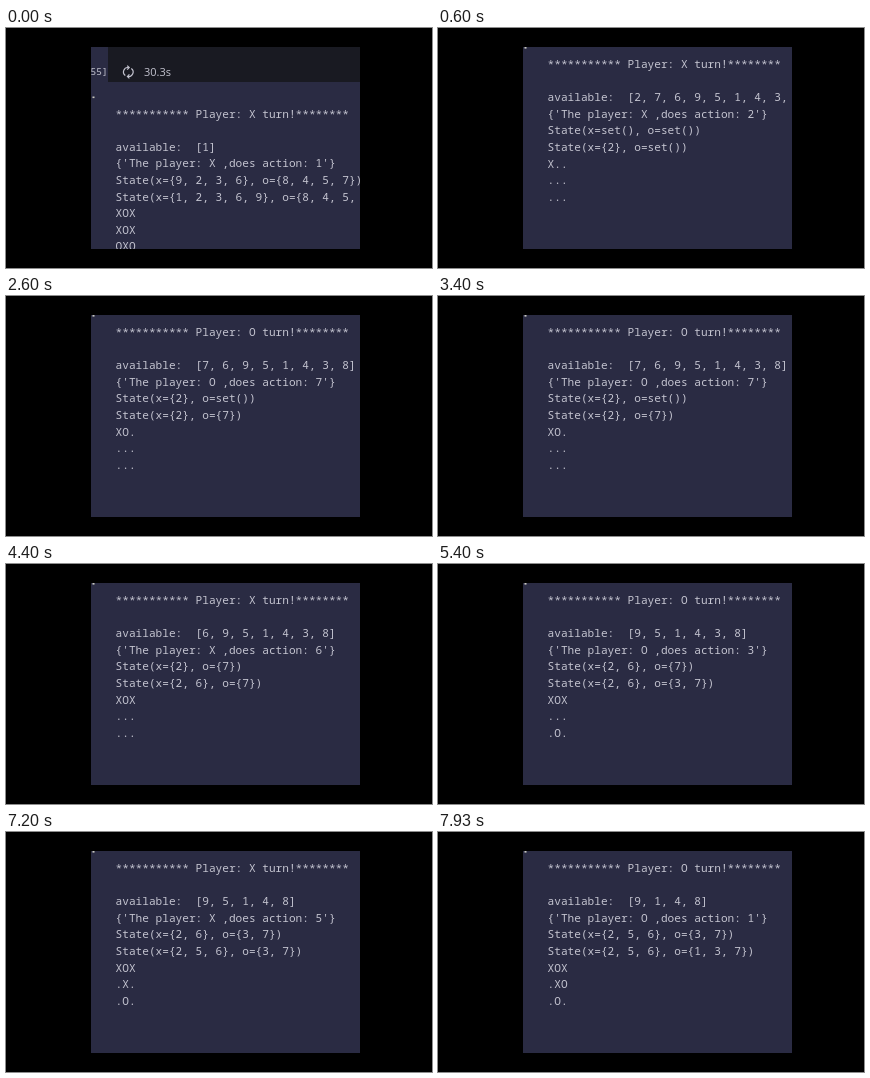
Animation of 426x240 px, one loop 8 s. Source, as an HTML page:

```html
<!DOCTYPE html>
<html lang="en">
<head>
<meta charset="utf-8">
<title>Tic-tac-toe log</title>
<style>
  html, body { margin: 0; width: 100%; height: 100%; overflow: hidden; background: #000; }
  svg { display: block; width: 100%; height: 100%; }
  text { fill: #c4c4d0; white-space: pre; }
  .log { font: 11.11px "Noto Sans Mono", "DejaVu Sans Mono", monospace; }
  .time { font: 11px "Open Sans", "Noto Sans", sans-serif; }
  .index { font: 9.5px "Noto Sans Mono", monospace; }
</style>
</head>
<body>
<svg viewBox="0 0 426 240">
  <clipPath id="panel"><rect x="85" y="19" width="269" height="202"/></clipPath>
  <g clip-path="url(#panel)">
    <rect x="85" y="19" width="269" height="202" fill="#2a2b43"/>
    <g id="header">
      <rect x="102" y="19" width="252" height="35" fill="#191a22"/>
      <text class="index" x="84.5" y="47">55]</text>
      <g fill="none" stroke="#c4c4d0" stroke-width="1.2">
        <path d="M119.3 47.5A4.4 4.4 0 0 1 122.6 39.6M125.3 40.5A4.4 4.4 0 0 1 122 48.4"/>
        <path d="M121.2 37.6L123.2 39.6L121.2 41.6M123.4 46.4L121.4 48.4L123.4 50.4"/>
      </g>
      <text class="time" x="138" y="48">30.3s</text>
    </g>
    <g id="output">
      <rect x="86.5" y="19" width="2" height="1.6" fill="#c8c8c0"/>
      <g id="lines"></g>
    </g>
  </g>
</svg>
<script>
const LOOP = 8000, LINE = 16.57;
const CELLS = [2, 7, 6, 9, 5, 1, 4, 3, 8];
const TURNS = [
  { at: 70, move: 2 },
  { at: 2070, move: 7 },
  { at: 4330, move: 6 },
  { at: 5330, move: 3 },
  { at: 6270, move: 5 },
  { at: 7270, move: 1 }
];
const byId = id => document.getElementById(id);

const rows = Array.from({ length: 9 }, (_, i) => {
  const row = document.createElementNS("http://www.w3.org/2000/svg", "text");
  row.setAttribute("class", "log");
  row.setAttribute("x", 109.6);
  row.setAttribute("y", 40.2 + i * LINE);
  return byId("lines").appendChild(row);
});

const setText = list => list.length ? `{${list.join(", ")}}` : "set()";
const stateText = (x, o) => `State(x=${setText(x)}, o=${setText(o)})`;

function boardText(x, o) {
  const marks = CELLS.map(c => x.includes(c) ? "X" : o.includes(c) ? "O" : ".").join("");
  return [0, 3, 6].map(i => marks.slice(i, i + 3));
}

function report(player, free, move, before, after) {
  return [
    `*********** Player: ${player} turn!********`,
    "",
    `available:  [${free.join(", ")}]`,
    `{'The player: ${player} ,does action: ${move}'}`,
    stateText(...before),
    stateText(...after),
    ...boardText(...after)
  ];
}

function turnReport(turn) {
  const moves = TURNS.map(t => t.move);
  const sides = count => [0, 1].map(side =>
    moves.slice(0, count).filter((_, i) => i % 2 === side).sort((a, b) => a - b));
  const free = CELLS.filter(c => !moves.slice(0, turn).includes(c));
  return report("XO"[turn % 2], free, moves[turn], sides(turn), sides(turn + 1));
}

const finished = report("X", [1], 1,
  [[9, 2, 3, 6], [8, 4, 5, 7]],
  [[1, 2, 3, 6, 9], [8, 4, 5, 7]]);
const screens = [finished, ...TURNS.map((_, i) => turnReport(i))];
let shown = -1;

function render(time) {
  const screen = TURNS.filter(t => time >= t.at).length;
  if (screen === shown) return;
  shown = screen;
  byId("header").style.display = screen ? "none" : "";
  byId("output").setAttribute("transform", `translate(0 ${screen ? 0 : 49.5})`);
  rows.forEach((row, i) => row.textContent = screens[screen][i]);
}

const start = performance.now();
function tick() {
  render((performance.now() - start) % LOOP);
  requestAnimationFrame(tick);
}
tick();
</script>
</body>
</html>
```
